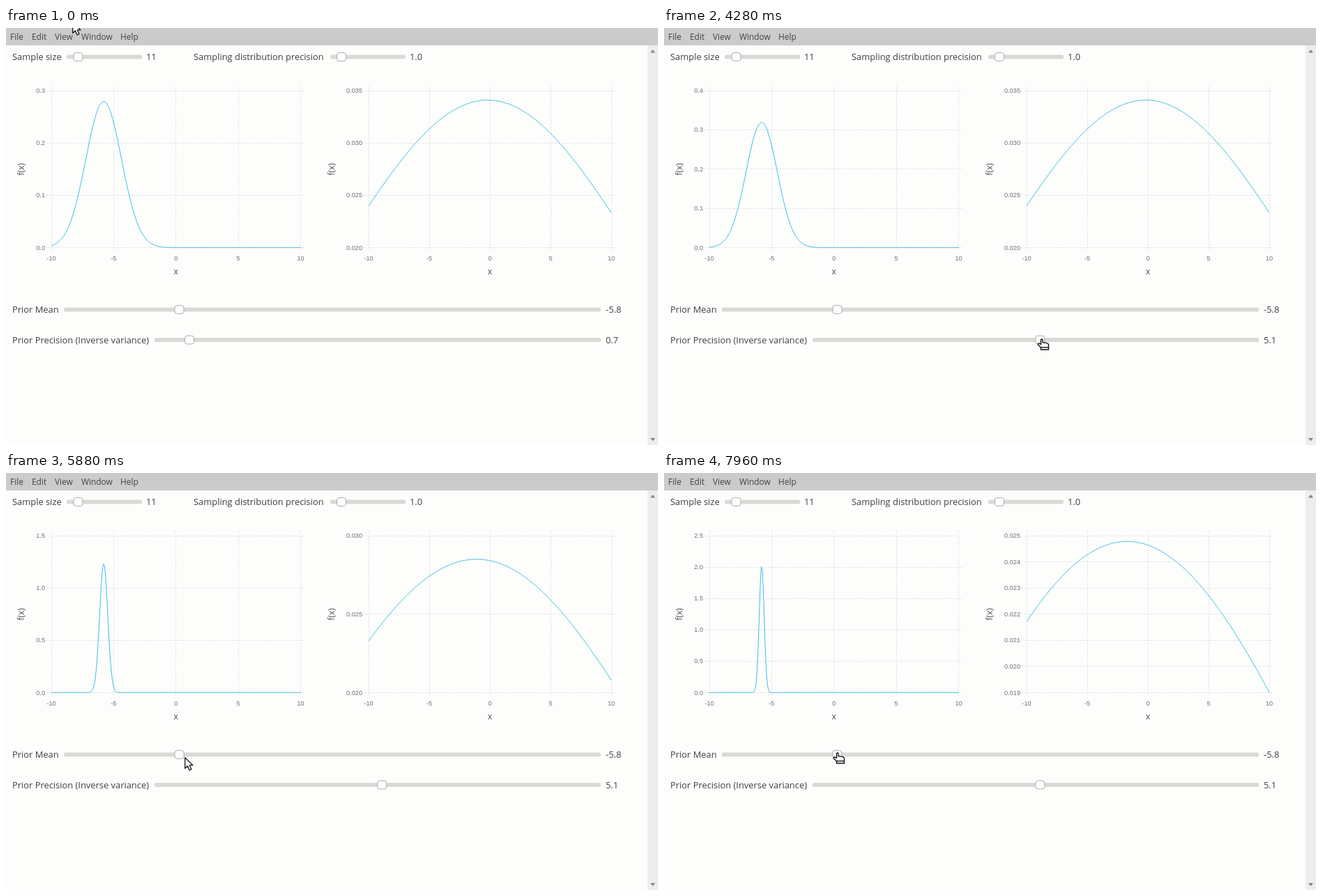
An HTML page that plays this animation: 935 px wide and 599 px high, repeating every 8 s.

```html
<!DOCTYPE html>
<html lang="en">
<head>
<meta charset="utf-8">
<title>Prior explorer</title>
<style>
  html, body { margin: 0; width: 100%; height: 100%; overflow: hidden; background: #fdfdfb; }
  svg { display: block; width: 935px; height: 599px; }
  .ui { font: 12.9px "Open Sans", "Noto Sans", sans-serif; fill: #403f44; }
  .menu { font: 11.9px "Open Sans", "Noto Sans", sans-serif; fill: #434343; }
  .tick { font: 9.2px "Liberation Sans", Arial, sans-serif; fill: #746a72; }
  .axis { font: 12px "Open Sans", "Noto Sans", sans-serif; fill: #564a55; text-anchor: middle; }
  .mid { text-anchor: middle; }
  .end { text-anchor: end; }
  .grid { fill: none; stroke: #d6d6de; stroke-dasharray: 1.5 2; }
  .curve { fill: none; stroke: #3cbfe6; stroke-linejoin: round; }
  .track { fill: #d9d9d6; }
  .thumb { fill: #fefefe; stroke: #adadb0; }
  .pointer { fill: #fff; stroke: #111; stroke-linejoin: round; }
</style>
</head>
<body>
<svg id="stage" viewBox="0 0 935 599">
  <rect width="935" height="599" fill="#fdfdfb"/>
  <rect width="935" height="25" fill="#cbcbcb"/>
  <rect x="920" y="25" width="15" height="574" fill="#ededf0"/>
  <path d="M924 35.500h7l-3.500-4.500zM924 589h7l-3.500 4.500z" fill="#85858c"/>
  <g id="controls"></g>
  <g id="plots"></g>
  <path id="arrow" class="pointer" stroke-width="1.3" d="M.7 .8V16.300L4.400 12.900L7 18.800L9.800 17.600L7.200 11.800H11.800Z"/>
  <g id="hand" class="pointer" stroke-width="1.4">
    <path d="M-1.500 1.300Q-1.500 0 -.3 0Q1 0 1 1.300V4.500L7 5.600Q9.500 6.100 9.500 8.300V15H-1.500V12L-5.500 8Q-6 5.800 -4 6.100L-1.500 7.500Z"/>
    <path d="M-1.500 11.800H9.500" fill="none"/>
  </g>
</svg>
<script>
const LOOP = 8000, MEAN = -5.8, SIZE = 11, SUM = 1.87;
const TOP = 90, BOTTOM = 315.5;
const $ = id => document.getElementById(id);

function add(parent, tag, attrs, text) {
  const el = document.createElementNS('http://www.w3.org/2000/svg', tag);
  for (const k in attrs) el.setAttribute(k, attrs[k]);
  if (text !== undefined) el.textContent = text;
  parent.appendChild(el);
  return el;
}

const label = (x, y, text, cls = 'ui') => add($('controls'), 'text', { x, y, class: cls }, text);

function slider(x1, x2, y, thumbX) {
  add($('controls'), 'rect', { x: x1, y: y - 3, width: x2 - x1, height: 6, rx: 2.5, class: 'track' });
  return add($('controls'), 'rect', { x: thumbX - 6.5, y: y - 6, width: 13, height: 12, rx: 3.5, class: 'thumb' });
}

[['File', 6], ['Edit', 37], ['View', 70], ['Window', 108], ['Help', 164]]
  .forEach(([text, x]) => label(x, 17, text, 'menu'));

label(9, 46, 'Sample size');
label(201, 46, '11');
label(269, 46, 'Sampling distribution precision');
label(579, 46, '1.0');
label(9, 408.5, 'Prior Mean');
label(860, 408.5, '-5.8');
label(9, 452.5, 'Prior Precision (Inverse variance)');
const valueText = label(860, 452.5, '0.7');

slider(87, 195, 41.5, 103.5);
slider(465, 573, 41.5, 481);
slider(83, 853, 404.5, 248.5);
const thumb = slider(213, 853, 448, 263);

const normal = (x, m, s) => Math.exp(-((x - m) ** 2) / (2 * s * s)) / (s * Math.sqrt(2 * Math.PI));

function priorTicks(lo, hi) {
  const step = hi <= 0.5 ? 0.1 : hi <= 1 ? 0.2 : 0.5;
  return { step, lo: 0, hi: Math.ceil(hi / step) * step };
}

// Tightest range with at most seven ticks; the coarser step wins a tie.
function posteriorTicks(lo, hi) {
  let best;
  for (const step of [0.005, 0.002, 0.001]) {
    const a = Math.floor(lo / step), b = Math.ceil(hi / step);
    const range = (b - a) * step;
    if (b - a > 6 || best && range > best.hi - best.lo - 1e-9) continue;
    best = { step, lo: a * step, hi: b * step };
  }
  return best;
}

function makePlot(o) {
  const root = add($('plots'), 'g', {});
  const sx = x => o.x1 + (x + 10) / 20 * (o.x2 - o.x1);
  [-10, -5, 0, 5, 10].forEach(x => {
    add(root, 'path', { class: 'grid', d: `M${Math.floor(sx(x)) + 0.5} 83V320` });
    add(root, 'text', { x: sx(x), y: 333.5, class: 'tick mid' }, x);
  });
  add(root, 'text', { x: (o.x1 + o.x2) / 2, y: 353.5, class: 'axis' }, 'x');
  add(root, 'text', { class: 'axis', transform: `translate(${o.titleX} 203) rotate(-90)` }, 'f(x)');
  const rows = add(root, 'g', {});
  const curve = add(root, 'path', { class: 'curve' });
  let shown;

  return p => {
    if (p === shown) return;
    shown = p;
    const [m, s] = o.params(p);
    const pts = Array.from({ length: 241 }, (_, i) => {
      const x = -10 + i / 12;
      return [x, normal(x, m, s)];
    });
    const ys = pts.map(q => q[1]);
    const { step, lo, hi } = o.ticks(Math.min(...ys), Math.max(...ys));
    const sy = y => BOTTOM - (y - lo) / (hi - lo) * (BOTTOM - TOP);
    rows.replaceChildren();
    const count = Math.round((hi - lo) / step);
    for (let i = 0; i <= count; i++) {
      const v = lo + i * step, y = sy(v);
      add(rows, 'path', { class: 'grid', d: `M${o.x1 - 7} ${Math.floor(y) + 0.5}H${o.x2 + 6}` });
      add(rows, 'text', { x: o.x1 - 9, y: y + 3, class: 'tick end' }, v.toFixed(o.digits));
    }
    curve.setAttribute('d', 'M' + pts.map(([x, y]) => sx(x).toFixed(2) + ' ' + sy(y).toFixed(2)).join('L'));
  };
}

const drawPrior = makePlot({
  x1: 65, x2: 422.5, titleX: 26, digits: 1,
  params: p => [MEAN, 1 / p], ticks: priorTicks
});
const drawPosterior = makePlot({
  x1: 520, x2: 868, titleX: 471, digits: 3,
  params: p => [(SUM + MEAN * p) / (SIZE + p), SIZE + p], ticks: posteriorTicks
});

const linear = u => u;
const smooth = u => u * u * (3 - 2 * u);

// keys: rows of [time, ...values]
function sample(keys, t, ease) {
  if (t <= keys[0][0]) return keys[0].slice(1);
  const i = keys.findIndex(k => k[0] > t);
  if (i < 0) return keys[keys.length - 1].slice(1);
  const a = keys[i - 1], b = keys[i];
  const u = ease((t - a[0]) / (b[0] - a[0]));
  return a.slice(1).map((v, j) => v + (b[j + 1] - v) * u);
}

const dragKeys = [[1280, 0.7], [2540, 5.1]];
// The plots work off the queued slider values after a delay.
const plotKeys = [[4279, 0.7], [4280, 0.82], [5040, 1.62], [5080, 1.66], [5880, 3.12], [6520, 3.92], [7440, 5.1]];
const mouseKeys = [
  [0, 95, -9], [1080, 266, 446], [1280, 266, 446], [2540, 542, 447],
  [4280, 542, 447], [5080, 360, 419], [5880, 256, 408], [6200, 249, 402]
];

const plotted = t => Math.floor(sample(plotKeys, t, linear)[0] * 10 + 1e-6) / 10;

function render(t) {
  const p = Math.round(sample(dragKeys, t, smooth)[0] * 10) / 10;
  thumb.setAttribute('x', 219 + p * 62.8 - 6.5);
  valueText.textContent = p.toFixed(1);
  drawPrior(plotted(t));
  drawPosterior(plotted(t - 40));

  const [x, y] = sample(mouseKeys, t, smooth);
  const pointing = t >= 1040 && t <= 4300 || t >= 5980;
  $('hand').style.display = pointing ? '' : 'none';
  $('arrow').style.display = pointing ? 'none' : '';
  $(pointing ? 'hand' : 'arrow').setAttribute('transform', `translate(${x.toFixed(1)} ${y.toFixed(1)})`);
}

const start = performance.now();
function tick() {
  render((performance.now() - start) % LOOP);
  requestAnimationFrame(tick);
}
tick();
</script>
</body>
</html>
```
